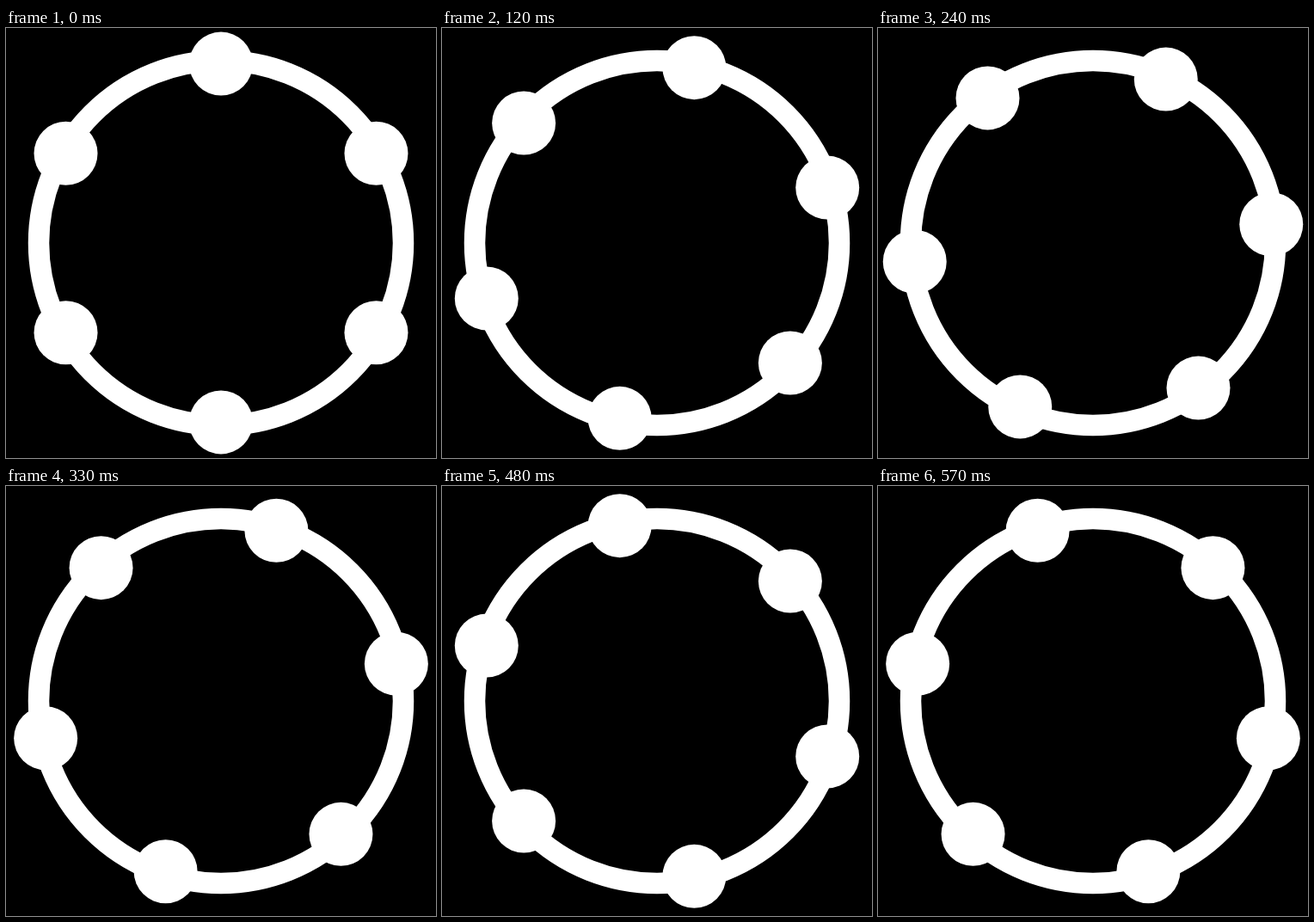
An HTML page for the animation above (600 ms loop, 500 by 500 pixels).

```html
<!DOCTYPE html>
<html lang="en">
<head>
<meta charset="utf-8">
<title>Rotating ring</title>
<style>
  html, body { margin: 0; width: 100%; height: 100%; overflow: hidden; background: #000; }
  svg { display: block; width: 100%; height: 100%; }
</style>
</head>
<body>
<svg viewBox="0 0 500 500">
  <circle cx="250" cy="250" r="212" fill="none" stroke="#fff" stroke-width="24.5"/>
  <g id="dots" fill="#fff"></g>
</svg>
<script>
  const CENTER = 250, ORBIT = 208.4, DOT_RADIUS = 37, DOT_COUNT = 6;
  const STEP_MS = 30, STEPS = 20;

  const group = document.getElementById('dots');
  const dots = Array.from({ length: DOT_COUNT }, () => {
    const dot = document.createElementNS('http://www.w3.org/2000/svg', 'circle');
    dot.setAttribute('r', DOT_RADIUS);
    return group.appendChild(dot);
  });

  // One clockwise turn per loop, in discrete steps.
  function render(ms) {
    const step = Math.floor(ms / STEP_MS) % STEPS;
    dots.forEach((dot, i) => {
      const angle = 2 * Math.PI * (step / STEPS + i / DOT_COUNT);
      dot.setAttribute('cx', CENTER + ORBIT * Math.sin(angle));
      dot.setAttribute('cy', CENTER - ORBIT * Math.cos(angle));
    });
  }

  const start = performance.now();
  function tick() {
    render(performance.now() - start);
    requestAnimationFrame(tick);
  }
  tick();
</script>
</body>
</html>
```
